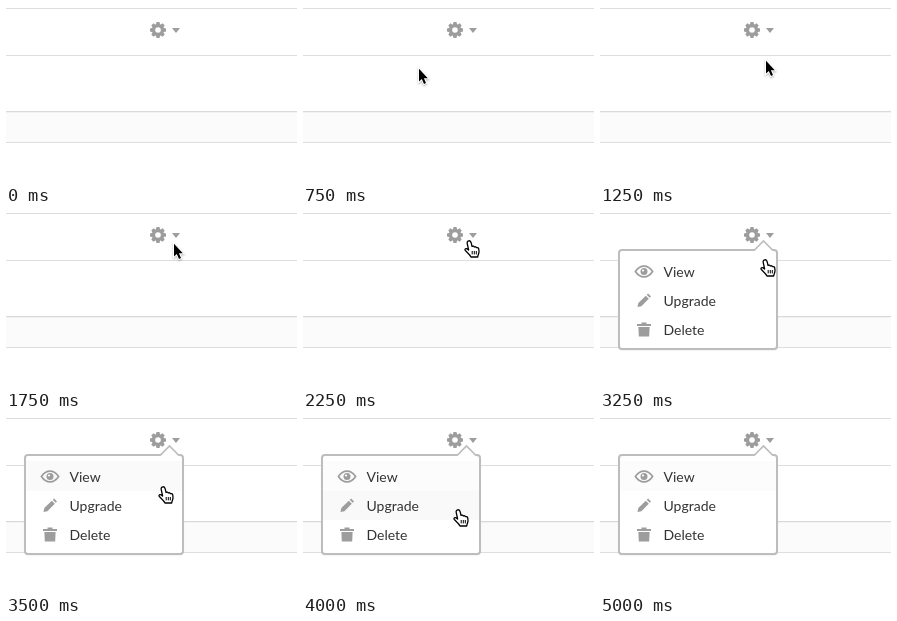
An HTML page with a canvas for the animation above (5750 ms loop, 291 px wide and 177 px high).

```html
<!DOCTYPE html>
<html lang="en">
<head>
<meta charset="utf-8">
<title>Settings menu</title>
<style>
  html, body { margin: 0; width: 100%; height: 100%; overflow: hidden; background: #fff; }
  canvas { display: block; width: 291px; height: 177px; }
</style>
</head>
<body>
<canvas id="stage"></canvas>
<script>
const W = 291, H = 177, LOOP = 5750;
const canvas = document.getElementById('stage');
const ctx = canvas.getContext('2d');
const scale = window.devicePixelRatio || 1;
canvas.width = W * scale;
canvas.height = H * scale;

const GREY = '#9d9d9d';
const MENU_OPEN = 2500;

// Pointer keys: time, kind, left, top
const pointerKeys = [
  [0, null], [500, 'arrow', 99, 35], [750, 'arrow', 114, 62],
  [1000, 'arrow', 133, 63], [1250, 'arrow', 164, 54],
  [1500, 'arrow', 174, 40], [1750, 'arrow', 166, 32],
  [2000, 'arrow', 166, 31], [2250, 'hand', 161, 29],
  [3000, 'hand', 160, 33], [3250, 'hand', 160, 48],
  [3500, 'hand', 152, 70], [3750, 'hand', 150, 91],
  [4000, 'hand', 150, 93], [5000, null]
];

const arrowPath = new Path2D('M2 .8V13.6L4.8 11L7 16L9 15.1L6.9 10.2H10.8Z');
const handPath = new Path2D(
  'M5 .8C6.3 .6 6.9 1.6 7.2 2.8L8 6.4C9 5.8 10 6.1 10.3 7' +
  'C11.2 6.5 12.2 6.8 12.6 7.7C13.7 7.3 14.7 8 14.8 9.2L15 11.8' +
  'C15 13.6 13.9 15 13.7 17H7C6 14.6 3.2 12.6 1.3 10.5' +
  'C.3 9.1 1.9 8 3.3 8.9L4.6 10L3.2 3.3C2.9 2 3.6 1 5 .8Z');
const fingerLines = new Path2D('M8.2 11V14.4M10.3 11V14.4M12.3 11V14.4');
const eyePath = new Path2D('M-8.6 0Q-5-5.4 0-5.4T8.6 0Q5 5.4 0 5.4T-8.6 0Z');

function rect(color, x, y, w, h) {
  ctx.fillStyle = color;
  ctx.fillRect(x, y, w, h);
}

function poly(color, ...pts) {
  ctx.beginPath();
  for (let i = 0; i < pts.length; i += 2) ctx.lineTo(pts[i], pts[i + 1]);
  ctx.closePath();
  ctx.fillStyle = color;
  ctx.fill();
}

function disc(color, x, y, r) {
  ctx.beginPath();
  ctx.arc(x, y, r, 0, Math.PI * 2);
  ctx.fillStyle = color;
  ctx.fill();
}

function at(x, y, draw) {
  ctx.save();
  ctx.translate(x, y);
  draw();
  ctx.restore();
}

function gear() {
  for (let i = 0; i < 8; i++) {
    ctx.save();
    ctx.rotate(i * Math.PI / 4);
    poly(GREY, -2.2, -5, -1.5, -8, 1.5, -8, 2.2, -5);
    ctx.restore();
  }
  disc(GREY, 0, 0, 6.1);
  disc('#fff', 0, 0, 2.8);
}

function page() {
  rect('#fff', 0, 0, W, H);
  rect('#dedede', 0, 2, W, 1);
  rect('#dedede', 0, 49, W, 1);
  rect('#fbfbfb', 0, 105, W, 32);
  rect('#d9d9d9', 0, 105, W, 1);
  rect('#f2f2f2', 0, 106, W, 1);
  rect('#dedede', 0, 136, W, 1);
  at(152, 24, gear);
  poly(GREY, 166, 22, 174, 22, 170, 27);
}

function eye() {
  ctx.lineWidth = 1.7;
  ctx.strokeStyle = GREY;
  ctx.stroke(eyePath);
  disc(GREY, 0, 0, 3.5);
  disc('#fff', -1, -1, 1.1);
}

function pencil() {
  poly(GREY, -6.5, 6.5, -5.7, 2.6, 1.8, -4.8, 4.8, -1.8, -2.6, 5.7);
  poly(GREY, 2.7, -5.7, 4.1, -7, 7, -4.1, 5.7, -2.7);
}

function trash() {
  rect(GREY, -2.5, -7, 5, 1.5);
  rect(GREY, -7, -5.5, 14, 2);
  poly(GREY, -5.6, -2.6, 5.6, -2.6, 5.2, 7, -5.2, 7);
}

const items = [['View', eye], ['Upgrade', pencil], ['Delete', trash]];

function menu(t) {
  ctx.beginPath();
  ctx.roundRect(19, 39, 158, 99, 3);
  ctx.save();
  ctx.shadowColor = 'rgba(0,0,0,.16)';
  ctx.shadowBlur = 2 * scale;
  ctx.shadowOffsetY = scale;
  ctx.fillStyle = '#fff';
  ctx.fill();
  ctx.restore();
  ctx.lineWidth = 2;
  ctx.strokeStyle = '#bdbdbd';
  ctx.stroke();

  poly('#fff', 154.5, 40, 163.5, 30, 172.5, 40);
  ctx.beginPath();
  ctx.moveTo(154.5, 39);
  ctx.lineTo(163.5, 30);
  ctx.lineTo(172.5, 39);
  ctx.lineWidth = 1.7;
  ctx.stroke();

  if (t >= 3500) rect(t < 3750 ? '#fafafa' : '#fcfcfc', 20, 45, 156, 30);
  if (t >= 3750 && t < 5000) rect('#f9f9f9', 20, 75, 156, 29);

  ctx.font = '14px Lato, "Open Sans", sans-serif';
  ctx.textBaseline = 'alphabetic';
  items.forEach(([label, icon], i) => {
    const y = 61 + i * 29;
    at(44, y - 0.5, icon);
    ctx.fillStyle = '#333';
    ctx.fillText(label, 63.5, y + 5);
  });
}

function arrow() {
  ctx.save();
  ctx.shadowColor = 'rgba(0,0,0,.3)';
  ctx.shadowBlur = 2 * scale;
  ctx.shadowOffsetY = scale;
  ctx.lineWidth = 2;
  ctx.strokeStyle = '#fff';
  ctx.stroke(arrowPath);
  ctx.restore();
  ctx.fillStyle = '#000';
  ctx.fill(arrowPath);
}

function hand() {
  ctx.lineJoin = 'round';
  ctx.fillStyle = '#fff';
  ctx.fill(handPath);
  ctx.strokeStyle = '#000';
  ctx.lineWidth = 1.3;
  ctx.stroke(handPath);
  ctx.lineWidth = 1;
  ctx.stroke(fingerLines);
}

const pointers = { arrow, hand };

function frame() {
  const t = performance.now() % LOOP;
  ctx.setTransform(scale, 0, 0, scale, 0, 0);
  page();
  if (t >= MENU_OPEN) menu(t);
  const [, kind, x, y] = pointerKeys.findLast(key => key[0] <= t);
  if (kind) at(x, y, pointers[kind]);
  requestAnimationFrame(frame);
}
frame();
</script>
</body>
</html>
```
